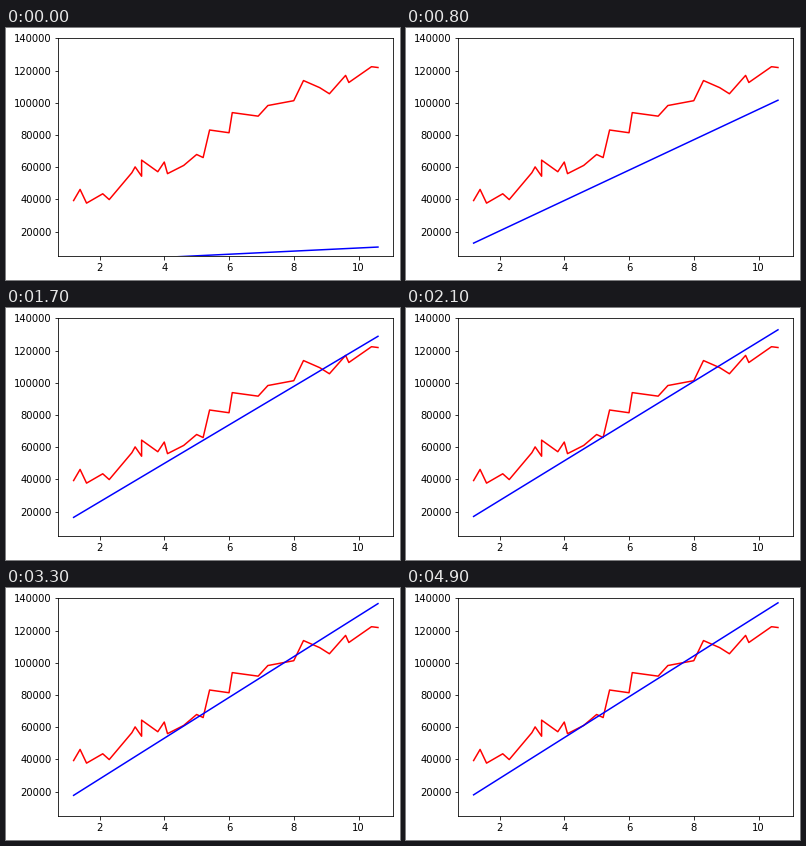
These frames come from a looping animation (394 px wide and 252 px high, 5 s). A matplotlib script:

```python
import matplotlib.pyplot as plt
from matplotlib.animation import FuncAnimation

W, H, DPI = 394, 252, 72
FRAMES, INTERVAL = 50, 100

# Corners of the red curve: x, y in thousands.
CORNERS = [
    (1.2, 39.3), (1.4, 46.2), (1.6, 37.7), (2.1, 43.5), (2.3, 39.9),
    (3, 56.6), (3.1, 60.2), (3.3, 54.4), (3.3, 64.4), (3.8, 57.2),
    (4, 63.2), (4.1, 56), (4.6, 61.1), (5, 67.9), (5.2, 66), (5.4, 83.1),
    (6, 81.4), (6.1, 93.9), (6.9, 91.7), (7.2, 98.3), (8, 101.3),
    (8.3, 113.8), (8.8, 109.4), (9.1, 105.6), (9.6, 117), (9.7, 112.6),
    (10.4, 122.4), (10.6, 121.9)]

# Least-squares trend that the blue line descends towards.
SLOPE, OFFSET = 9450, 24848
X_MEAN, X_VAR = 5.413, 7.784
RATE = 0.002
STEPS_PER_FRAME = 2


def fit(steps):
    """Slope and offset after some gradient steps from a zero line."""
    m = b = 0.0
    for _ in range(steps):
        dm, db = SLOPE - m, OFFSET - b
        m += RATE * ((X_VAR + X_MEAN ** 2) * dm + X_MEAN * db)
        b += RATE * (X_MEAN * dm + db)
    return m, b


plt.rcParams.update({"font.family": "DejaVu Sans", "font.size": 10})
fig = plt.figure(figsize=(W / DPI, H / DPI), dpi=DPI, facecolor="white")
ax = fig.add_axes([52.39 / W, 24.2 / H, 334.8 / W, 217.44 / H])
xs, ys = zip(*CORNERS)
ax.plot(xs, [1000 * y for y in ys], color="red", lw=1.5)
ends = xs[0], xs[-1]
line, = ax.plot(ends, ends, color="blue", lw=1.5)
ax.set_xlim(0.73, 11.07)
ax.set_ylim(5000, 140000)
ax.set_xticks(range(2, 11, 2))
ax.set_yticks(range(20000, 140001, 20000))


def draw(i):
    m, b = fit(STEPS_PER_FRAME * i + 1)
    line.set_ydata([m * x + b for x in ends])
    return line,


anim = FuncAnimation(fig, draw, frames=FRAMES, interval=INTERVAL,
                     repeat=True, repeat_delay=0)
plt.show()
```
